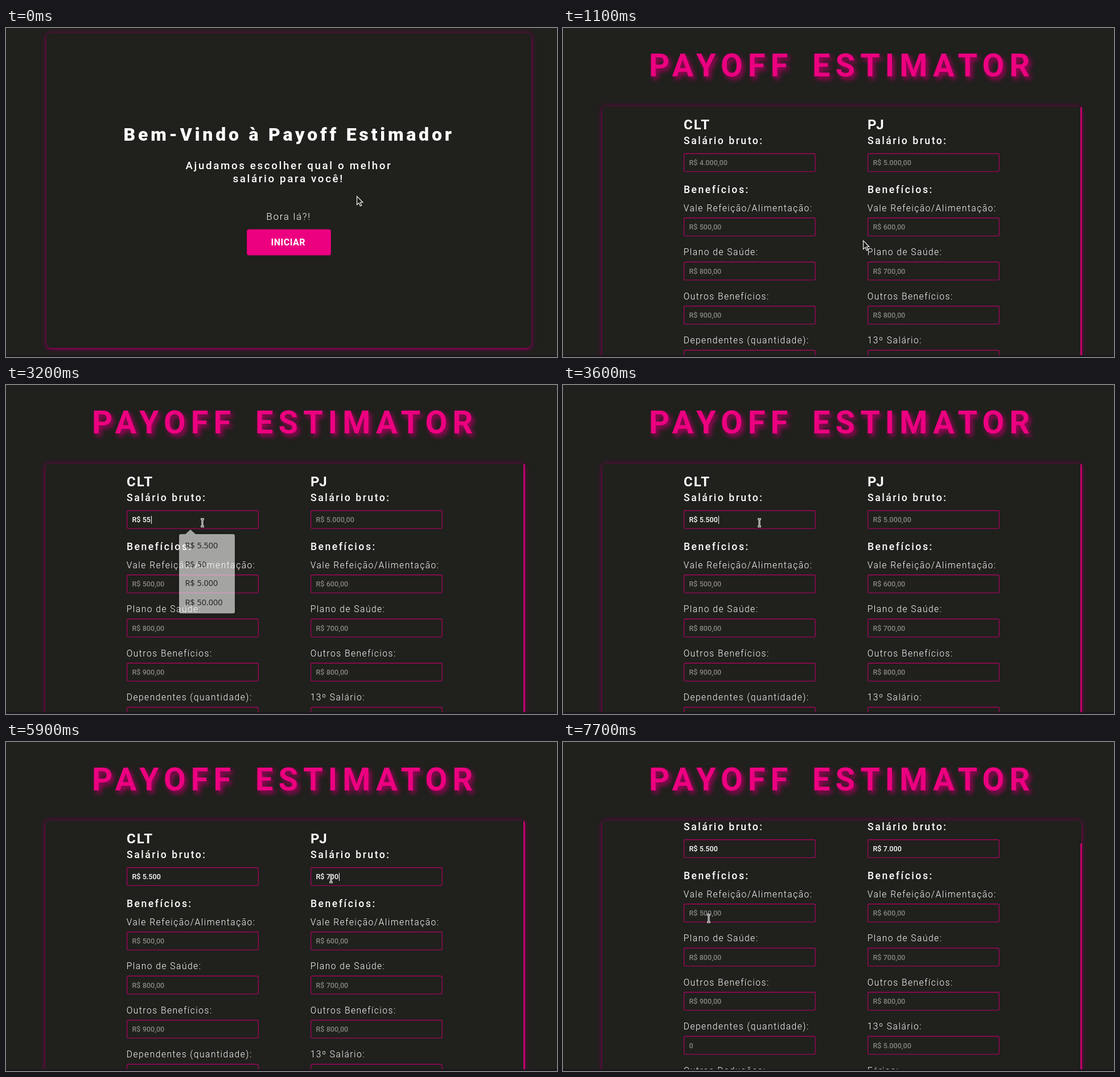
Write an HTML page that moves like this. It is 968 px wide and 578 px high and loops after 8000 ms.

```html
<!DOCTYPE html>
<html lang="pt-BR">
<head>
<meta charset="utf-8">
<title>Payoff Estimator</title>
<style>
  html, body { margin: 0; width: 100%; height: 100%; overflow: hidden; background: #20201d; }
  svg { display: block; width: 968px; height: 578px; font-family: Roboto, sans-serif; fill: #fff; }
  text { white-space: pre; }
  .card { fill: #20201d; filter: drop-shadow(0 2px 1.5px #85004f) drop-shadow(0 0 4px #70004c); }
  .brand { font-weight: 700; font-size: 56px; letter-spacing: 9.1px; fill: #ec0080; filter: drop-shadow(4px 5px 4px #a8005e); }
  .welcome { font-weight: 900; font-size: 32px; letter-spacing: .15em; }
  .lead { font-weight: 500; font-size: 18.72px; letter-spacing: 2.65px; }
  .invite { font-weight: 300; font-size: 17px; letter-spacing: .1em; }
  .action { font-weight: 700; font-size: 16px; letter-spacing: .5px; }
  .column { font-weight: 700; font-size: 24px; letter-spacing: 2px; }
  .section { font-weight: 500; font-size: 17.6px; letter-spacing: 2.5px; }
  .label { font-weight: 300; font-size: 15.6px; letter-spacing: 1.5px; }
  .field { fill: none; stroke: #b80066; stroke-width: 1.1; }
  .hint, .value { font-weight: 500; font-size: 12.6px; }
  .hint { fill: #858582; }
  .popup { fill: #fdfdfd; filter: drop-shadow(0 1px 2px #0008); }
  .option { font: 14.4px "Noto Sans", sans-serif; fill: #2e2e2e; }
</style>
</head>
<body>
<svg id="stage" viewBox="0 0 968 578"></svg>
<script>
const LOOP = 8000, STEP = 100;
const stage = document.getElementById('stage');
const pen = document.createElement('canvas').getContext('2d');

const COLUMNS = [
  { x: 212, name: 'CLT', salary: 'R$ 4.000,00', rows: [
    ['Vale Refeição/Alimentação:', 'R$ 500,00'], ['Plano de Saúde:', 'R$ 800,00'],
    ['Outros Benefícios:', 'R$ 900,00'], ['Dependentes (quantidade):', '0'], ['Outras Deduções:', '']] },
  { x: 535, name: 'PJ', salary: 'R$ 5.000,00', rows: [
    ['Vale Refeição/Alimentação:', 'R$ 600,00'], ['Plano de Saúde:', 'R$ 700,00'],
    ['Outros Benefícios:', 'R$ 800,00'], ['13º Salário:', 'R$ 5.000,00'], ['Férias:', '']] }
];
const FIELD_TOPS = [220, 333, 410.5, 488, 565.5];

// [time, x, y]
const POINTER = [
  [0, 616, 295], [100, 616, 295], [600, 527, 373], [1100, 527, 373], [1200, 624, 361],
  [1500, 624, 361], [2000, 345, 242], [4000, 345, 242], [4400, 571, 240], [6300, 571, 240],
  [6700, 316, 342], [6800, 316, 342], [7100, 297, 342], [7200, 297, 342], [7300, 104, 307],
  [7400, 104, 307], [7500, 591, 188], [7700, 256, 310], [LOOP, 256, 310]
];
const SCROLL = [[0, 0], [6600, 0], [6700, 3], [6800, 11], [6900, 29], [7000, 43], [7100, 49], [LOOP, 49]];
const TYPING = [
  [[0, ''], [3000, 'R$ 5'], [3200, 'R$ 55'], [3500, 'R$ 550'], [3600, 'R$ 5.500']],
  [[0, ''], [5200, 'R$ 7'], [5500, 'R$ 70'], [5900, 'R$ 700'], [6000, 'R$ 7.000']]
];
// [time, column with a visible caret]
const CARET = [[0, -1], [2200, 0], [2600, -1], [3000, 0], [4100, -1], [4500, 1], [6400, -1]];

const FIVES = ['R$ 5.500', 'R$ 50', 'R$ 5.000', 'R$ 50.000'];
const ALL_CLT = [...FIVES, 'R$ 4.000', 'R$ 6.000'];
const ALL_PJ = ['R$ 7.000', 'R$ 50', 'R$ 10.000', 'R$ 7.500', 'R$ 6.000', 'R$ 124'];
const SEVENS = ['R$ 7.000', 'R$ 7.500'];
// [time, column, options, width, opacity]
const POPUPS = [
  [0], [2200, 0, ALL_CLT, 296, .5], [2300, 0, ALL_CLT, 296, 1], [3000, 0, FIVES, 98, 1],
  [3200, 0, FIVES, 98, .6], [3300, 0, FIVES, 98, .15], [3500],
  [4500, 1, ALL_PJ, 100, .5], [4600, 1, ALL_PJ, 100, 1],
  [5500, 1, SEVENS, 89, .6], [5600, 1, SEVENS, 89, .15], [5900]
];

const latest = (keys, t) => keys.findLast(key => key[0] <= t);

function tween(keys, t) {
  const next = keys.findIndex(key => key[0] > t);
  const [a, b] = [keys[next - 1], keys[next]];
  const k = (t - a[0]) / (b[0] - a[0]);
  return a.slice(1).map((v, i) => v + (b[i + 1] - v) * k);
}

const text = (style, x, y, content) => `<text class="${style}" x="${x}" y="${y}">${content}</text>`;
const rect = (x, y, w, h, r, attrs) =>
  `<rect x="${x}" y="${y}" width="${w}" height="${h}" rx="${r}" ${attrs}/>`;
const inside = (px, py, x, y, w, h) => px >= x && px <= x + w && py >= y && py <= y + h;

function textWidth(content) {
  pen.font = '500 12.6px Roboto, sans-serif';
  return pen.measureText(content).width;
}

function welcomePage(hover) {
  return rect(71, 9, 852, 553, 8, 'class="card"') +
    text('welcome', 206.5, 198, 'Bem-Vindo à Payoff Estimador') +
    text('lead', 315.5, 248, 'Ajudamos escolher qual o melhor') +
    text('lead', 398.5, 271, 'salário para você!') +
    text('invite', 457.3, 337, 'Bora lá?!') +
    rect(423.5, 354, 147, 45, 3, `fill="${hover ? '#c4006a' : '#ec0080'}" stroke="#d20074"`) +
    text('action', 465.5, 382, 'INICIAR');
}

function field(x, y, hint, value) {
  return rect(x + .6, y + .6, 230.6, 31.6, 2.5, 'class="field"') +
    text(value ? 'value' : 'hint', x + 9.5, y + 21, value || hint);
}

function column({ x, name, salary, rows }, value, caretOn) {
  let out = text('column', x, 178, name) + text('section', x, 204, 'Salário bruto:') +
    field(x, 220, salary, value) + text('section', x, 290, 'Benefícios:');
  rows.forEach(([label, hint], i) => {
    const y = 321.5 + i * 77.5;
    out += text('label', x - .3, y, label) + field(x, y + 11.5, hint);
  });
  if (caretOn) out += rect(Math.round(x + 10.5 + textWidth(value)), 230, 1, 14, 0, '');
  return out;
}

function popup([, col, options, width, opacity]) {
  if (!options) return '';
  const x = COLUMNS[col].x + 92, height = options.length * 33.3 + 6;
  const items = options.map((option, i) => text('option', x + 10.5, 287 + i * 33.2, option)).join('');
  return `<g opacity="${opacity}"><g class="popup">${rect(x, 262, width, height, 3, '')}
    <path d="M${x + 11} 262l9-8 9 8z"/></g>${items}</g>`;
}

function formPage(t, scroll) {
  const caret = latest(CARET, t)[1];
  const thumb = Math.max(139, 134 + scroll * .9);
  const columns = COLUMNS.map((c, i) => column(c, latest(TYPING[i], t)[1], caret === i)).join('');
  return text('brand', 151, 85, 'PAYOFF') + text('brand', 438, 85, 'ESTIMATOR') +
    rect(69, 138, 842, 500, 8, 'class="card"') +
    rect(909, thumb, 2.5, 500, 1, 'fill="#d40074"') +
    `<clipPath id="view">${rect(69, 139, 840, 439, 0, '')}</clipPath>
     <g clip-path="url(#view)"><g transform="translate(0 ${-scroll})">${columns}</g></g>` +
    popup(latest(POPUPS, t));
}

const ARROW = '<path d="M.5.5V15.5L4 12.3 6.4 17.8 8.8 16.8 6.5 11.3H11Z" fill="#20201d" stroke="#fff" stroke-width="1.1"/>';
const BEAM_PATH = 'M-3-6.5H3M0-6.5V6.5M-3 6.5H3';
const BEAM = `<path d="${BEAM_PATH}" stroke="#fff" stroke-width="3"/><path d="${BEAM_PATH}" stroke="#20201d" stroke-width=".8"/>`;
const HAND = '<path d="M-1.5 1Q0-1 1.5 1V7L8 8.5Q10 9 9.5 12L8 18H0L-5 11Q-4 8-1.5 11Z" fill="#20201d" stroke="#fff"/>';

function render(t) {
  const [x, y] = tween(POINTER, t);
  const [scroll] = tween(SCROLL, t);
  const onForm = t >= 1100;
  const onButton = !onForm && inside(x, y, 423, 354, 148, 46);
  const onField = onForm && COLUMNS.some(c =>
    FIELD_TOPS.some(top => inside(x, y, c.x, top - scroll, 232, 33)));
  stage.innerHTML = (onForm ? formPage(t, scroll) : welcomePage(onButton)) +
    rect(0, 575, 968, 3, 0, 'fill="#1a161c"') +
    `<g transform="translate(${x} ${y})">${onButton ? HAND : onField ? BEAM : ARROW}</g>`;
}

// The picture advances in whole steps.
let shown = -1;
function tick() {
  const t = Math.floor(performance.now() % LOOP / STEP) * STEP;
  if (t !== shown) render(shown = t);
  requestAnimationFrame(tick);
}
tick();
</script>
</body>
</html>
```
